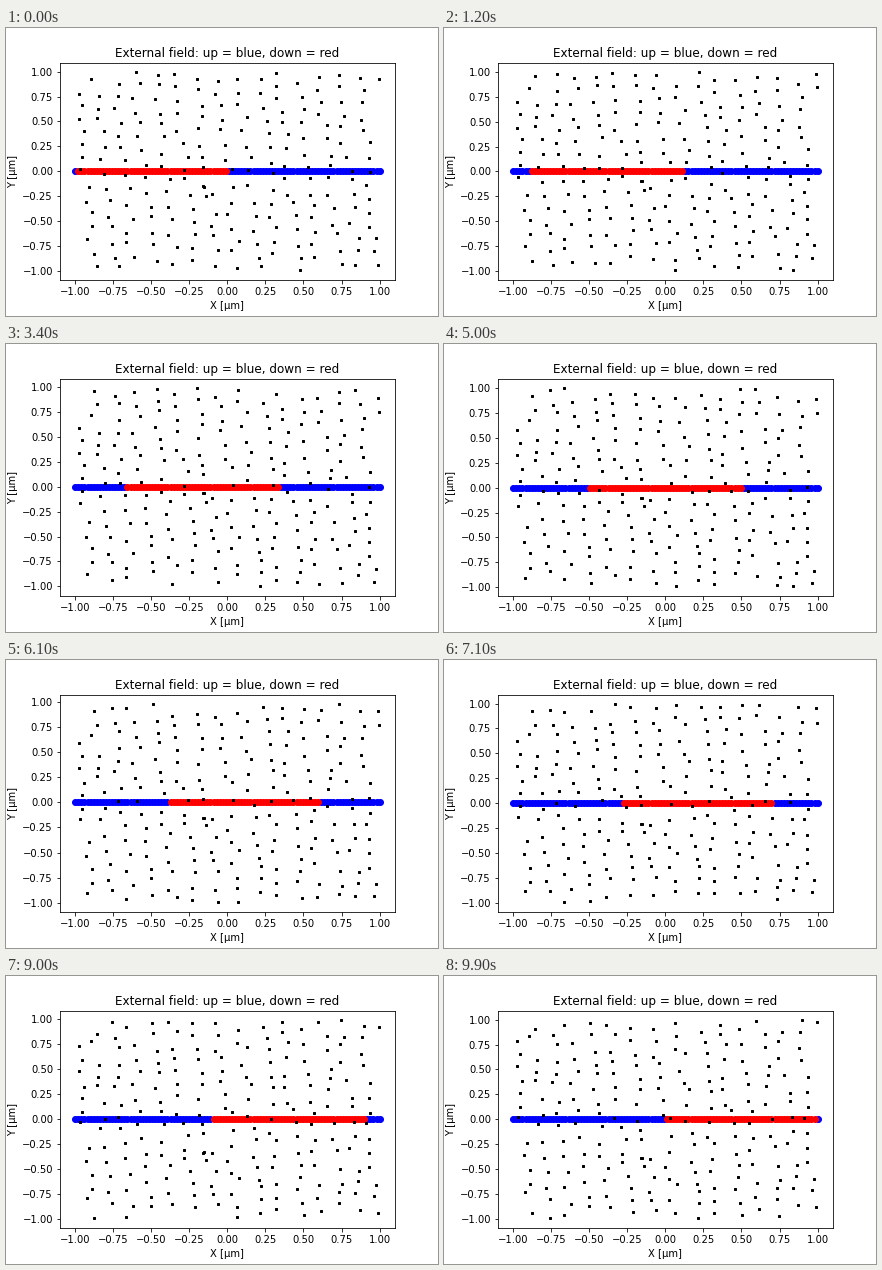
A matplotlib script for the animation above (10 s loop, 432 px wide and 288 px high).

```python
import numpy as np
import matplotlib.pyplot as plt
from matplotlib.animation import FuncAnimation

FRAMES = 100
INTERVAL = 100
CELLS = 15       # tracers per side of the lattice
JITTER = 0.5     # random offset, in cells
SPEED = 0.0066   # peak vertical drift per frame
LEAD = 0.04      # drift runs slightly ahead of the domain

plt.rcParams.update({"font.family": "DejaVu Sans", "font.size": 10})
fig = plt.figure(figsize=(6, 4), dpi=72, facecolor="white")
fig.subplots_adjust(left=0.125, right=0.9, bottom=0.125, top=0.88)
ax = fig.add_subplot()


def wrap(v):
    """Fold a coordinate back into the box from -1 to 1."""
    return (v + 1) % 2 - 1


def lattice(seed):
    """Loose lattice whose rows and columns lean down to the right."""
    rng = np.random.default_rng(seed)
    row, col = np.divmod(np.arange(CELLS ** 2), CELLS)
    dx, dy = JITTER * (rng.random((2, CELLS ** 2)) - 0.5)
    x = 2 * (col - row / CELLS + dx) / CELLS
    y = 2 * (row - 2 * col / CELLS + dy) / CELLS
    return wrap(x), wrap(y)


x0, y0 = lattice(seed=4)
line = np.linspace(-1, 1, 100)


def wave(shift):
    return np.sin(np.pi * (shift + LEAD - x0))


def heights(shift):
    """Tracer heights after drifting in a travelling shear wave."""
    return wrap(y0 + SPEED * FRAMES / np.pi * (wave(shift) - wave(0)))


def dots(x, y, color, size, marker="o"):
    ax.plot(x, y, marker, color=color, ms=size)


def draw(frame):
    shift = frame / FRAMES
    down = (line > shift - 1) & (line < shift)
    ax.clear()
    dots(line[~down], 0 * line[~down], "blue", 6)
    dots(line[down], 0 * line[down], "red", 6)
    dots(x0, heights(shift), "black", 2, "s")
    ax.set_title("External field: up = blue, down = red")
    ax.set_xlabel("X [μm]")
    ax.set_ylabel("Y [μm]")
    return ax.lines


anim = FuncAnimation(fig, draw, frames=FRAMES, interval=INTERVAL,
                     init_func=lambda: draw(0), repeat=True, repeat_delay=0)
plt.show()
```
